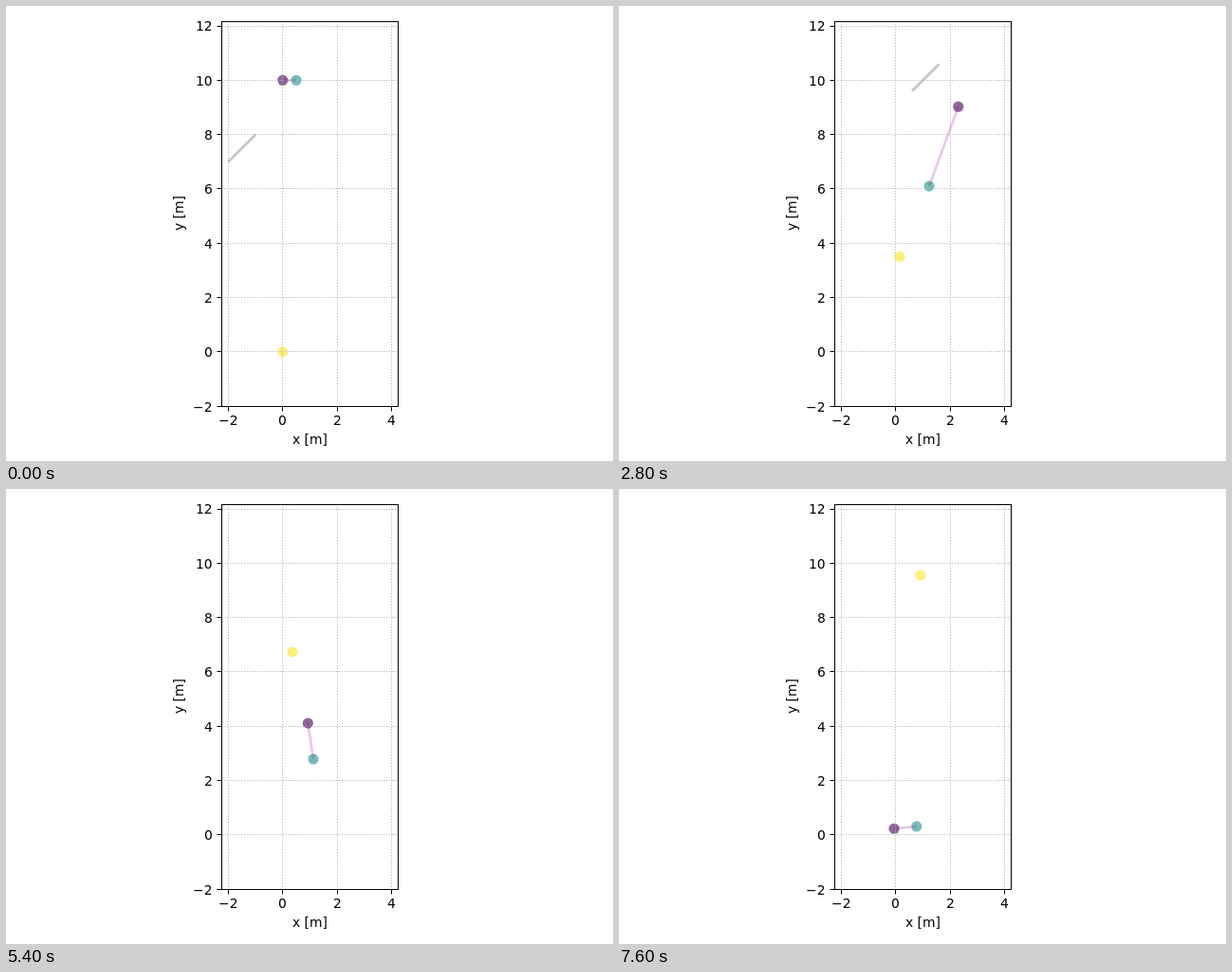
Animation of 640 by 480 pixels, one loop 8 s. Source, as an HTML page with a canvas:

```html
<!DOCTYPE html>
<html lang="en">
<head>
<meta charset="utf-8">
<title>Moving points</title>
<style>
  html, body { margin: 0; width: 100%; height: 100%; overflow: hidden; background: #fff; }
  canvas { display: block; }
</style>
</head>
<body>
<canvas id="stage" width="640" height="480"></canvas>
<script>
const ctx = document.getElementById('stage').getContext('2d');

const STEP = 200, LOOP = 8000, LAST = 38;
const SCALE = 28.65;
const LEFT = 227.5, TOP = 16.5, WIDTH = 186, HEIGHT = 406;
const BOTTOM = TOP + HEIGHT;

const toX = x => 291.75 + SCALE * x;
const toY = y => 364.85 - SCALE * y;
const snap = v => Math.floor(v) + 0.5;
const evens = (from, to) => Array.from({ length: (to - from) / 2 + 1 }, (_, i) => from + 2 * i);
const X_TICKS = evens(-2, 4), Y_TICKS = evens(-2, 12);

// Key points: step, x, y in metres
const purplePath = [
  [0, 0, 10], [4, 0.01, 9.45], [8, 1.25, 10.17], [12, 2.22, 9.64],
  [19, 1.8, 6.94], [31, 0.5, 2.72], [38, -0.06, 0.23]
];
const tealPath = [
  [0, 0.5, 10], [4, 0.83, 8.64], [10, 1.1, 6.98], [19, 1.31, 5.04],
  [31, 1.01, 1.64], [36, 0.92, 0.3], [38, 0.77, 0.31]
];
const yellowPath = [[0, 0, 0], [10, 0.2, 2.54], [19, 0.08, 4.7], [31, 0.56, 7.77], [38, 0.91, 9.56]];

function slope(path, i, axis) {
  const secant = j => (path[j + 1][axis] - path[j][axis]) / (path[j + 1][0] - path[j][0]);
  if (i === 0) return secant(0);
  if (i === path.length - 1) return secant(i - 1);
  const before = path[i][0] - path[i - 1][0];
  const after = path[i + 1][0] - path[i][0];
  return (secant(i - 1) * after + secant(i) * before) / (before + after);
}

// Smooth cubic through the key points, in stage pixels
function along(path, k) {
  let i = 0;
  while (i < path.length - 2 && k >= path[i + 1][0]) i++;
  const a = path[i], b = path[i + 1], span = b[0] - a[0];
  const u = (k - a[0]) / span, v = 1 - u;
  const [x, y] = [1, 2].map(axis =>
    a[axis] * v * v * (1 + 2 * u) + b[axis] * u * u * (3 - 2 * u) +
    span * u * v * (slope(path, i, axis) * v - slope(path, i + 1, axis) * u));
  return [toX(x), toY(y)];
}

function line(x1, y1, x2, y2, color, width = 1) {
  ctx.strokeStyle = color;
  ctx.lineWidth = width;
  ctx.beginPath();
  ctx.moveTo(x1, y1);
  ctx.lineTo(x2, y2);
  ctx.stroke();
}

function dot([x, y], color) {
  ctx.fillStyle = color;
  ctx.beginPath();
  ctx.arc(x, y, 5.6, 0, 2 * Math.PI);
  ctx.fill();
}

// Text starts on a whole pixel; anchor is 0.5 for centred, 1 for right-aligned
function text(value, x, y, anchor) {
  const str = String(value).replace('-', '\u2212');
  ctx.fillText(str, Math.round(x - anchor * ctx.measureText(str).width), Math.round(y));
}

function drawGrid() {
  ctx.setLineDash([1.11, 1.83]);
  for (const x of X_TICKS.map(toX).map(snap)) line(x, BOTTOM, x, TOP, '#b0b0b0');
  for (const y of Y_TICKS.map(toY).map(snap)) line(LEFT, y, LEFT + WIDTH, y, '#b0b0b0');
  ctx.setLineDash([]);
}

function drawAxes() {
  ctx.strokeStyle = ctx.fillStyle = '#000';
  ctx.lineWidth = 1;
  ctx.strokeRect(LEFT, TOP, WIDTH, HEIGHT);
  ctx.font = '13.89px "DejaVu Sans", sans-serif';

  for (const n of X_TICKS) {
    const x = snap(toX(n));
    line(x, BOTTOM, x, BOTTOM + 5, '#000');
    text(n, toX(n), 442, 0.5);
  }
  for (const n of Y_TICKS) {
    const y = snap(toY(n));
    line(LEFT, y, LEFT - 5, y, '#000');
    text(n, 217.8, toY(n) + 5.4, 1);
  }
  text('x [m]', 320, 462, 0.5);

  ctx.save();
  ctx.translate(187, 219);
  ctx.rotate(-Math.PI / 2);
  text('y [m]', 0, 0, 0.5);
  ctx.restore();
}

function draw(k) {
  const purple = along(purplePath, k);
  const teal = along(tealPath, k);
  const shift = 0.2 * Math.max(0, k - 1);

  ctx.fillStyle = '#fff';
  ctx.fillRect(0, 0, 640, 480);

  ctx.save();
  ctx.beginPath();
  ctx.rect(LEFT, TOP, WIDTH, HEIGHT);
  ctx.clip();
  dot(purple, 'rgba(68,1,84,.6)');
  dot(teal, 'rgba(33,145,140,.6)');
  dot(along(yellowPath, k), 'rgba(253,231,37,.6)');
  drawGrid();
  line(toX(shift - 2), toY(shift + 7), toX(shift - 1), toY(shift + 8), 'rgba(128,128,128,.45)', 2.78);
  line(...purple, ...teal, 'rgba(128,0,128,.2)', 2.78);
  ctx.restore();

  drawAxes();
}

function tick() {
  const k = Math.floor((performance.now() % LOOP) / STEP);
  draw(Math.min(k, LAST));
  requestAnimationFrame(tick);
}
tick();
</script>
</body>
</html>
```
